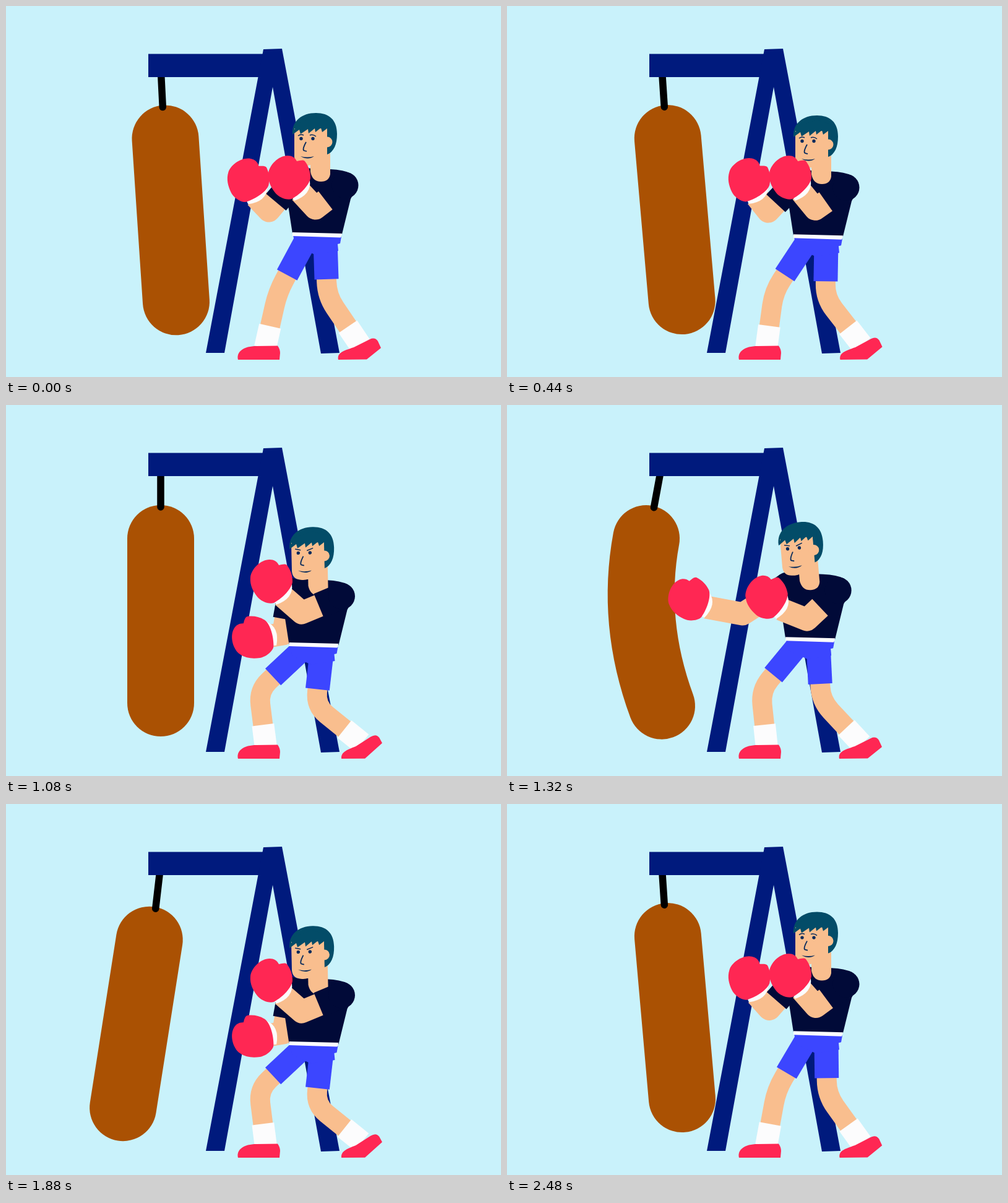
Recreate the animation shown at these times as an HTML page with a canvas. Size 800x600 px, loop 2.52 s.

```html
<!DOCTYPE html>
<html lang="en">
<head>
<meta charset="utf-8">
<title>Boxing training</title>
<style>
html, body { margin: 0; width: 100%; height: 100%; overflow: hidden; background: #c9f2fb; }
canvas { display: block; }
</style>
</head>
<body>
<canvas id="stage" width="800" height="600"></canvas>
<script>
const ctx = document.getElementById('stage').getContext('2d');
const LOOP = 2520, HITS = [1285, 2072];
const C = {
  sky: '#c9f2fb', stand: '#001a7d', bag: '#aa5103', skin: '#f9be8e', shirt: '#010a38',
  shorts: '#3c46ff', red: '#ff2753', white: '#fcfcfd', hair: '#034c68', ink: '#062a5c'
};

const lerp = (a, b, u) => a + (b - a) * u;
const mix = (p, q, u) => p.map((v, i) => lerp(v, q[i], u));
const add = (p, x, y) => [p[0] + x, p[1] + y];
const toward = (p, q, dist) => mix(p, q, dist / Math.hypot(q[0] - p[0], q[1] - p[1]));
const ease = (t, from, to) => {
  const u = Math.min(1, Math.max(0, (t - from) / (to - from)));
  return u * u * (3 - 2 * u);
};
const wrap = t => (t % LOOP + LOOP) % LOOP;

// Rises from a to b, holds until c and falls to d, in ms around each hit
const pulse = (t, a, b, c, d) => HITS.reduce((sum, hit) => {
  const since = wrap(t - hit + 600) - 600;
  return sum + ease(since, a, b) - ease(since, c, d);
}, 0);

function fill(color, d) {
  ctx.fillStyle = color;
  ctx.fill(new Path2D(d));
}
function stroke(color, width, d, cap = 'butt') {
  ctx.strokeStyle = color;
  ctx.lineWidth = width;
  ctx.lineCap = cap;
  ctx.lineJoin = 'round';
  ctx.stroke(new Path2D(d));
}
function dot(color, x, y, r) {
  ctx.fillStyle = color;
  ctx.beginPath();
  ctx.arc(x, y, r, 0, 7);
  ctx.fill();
}
function at(x, y, degrees, px, py, draw) {
  ctx.save();
  ctx.translate(x, y);
  ctx.rotate(degrees * Math.PI / 180);
  ctx.translate(-px, -py);
  draw();
  ctx.restore();
}

// Sideways offset of the bag's foot: a wave that starts far left and settles
function swing(since) {
  const drift = -80 * Math.exp(-since / 420);
  const wave = Math.cos(2 * Math.PI * (since - 410) / 470);
  return lerp(drift, 33, wave) * (1 - ease(since, 880, 1240));
}

function drawBag(t) {
  const since = HITS.map(hit => wrap(t - hit));
  const latest = Math.min(...since);
  const foot = lerp(swing(Math.max(...since)), swing(latest), ease(latest, 40, 140));
  const dent = pulse(t, 0, 65, 65, 200);
  const top = [250 + .3 * foot - 43 * dent, 216 - .06 * foot];
  const bottom = [250 + foot, 482 - .15 * foot + 8 * dent];
  const bend = [250 + .65 * foot - 86 * dent, (top[1] + bottom[1]) / 2];
  const hook = toward(top, bend, -51);
  stroke(C.bag, 108, `M${top} Q${bend} ${bottom}`, 'round');
  stroke('#000', 11.5, `M250 98 L${lerp(hook[0], 250, .2)} ${hook[1]}`, 'round');
}

function drawStand() {
  fill(C.stand, 'M230 77.5H416V115H230Z');
  fill(C.stand, 'M416 70L446 69L539 561L509 562L431 131L353 561L323 561Z');
}

// Where the knee of a two-bone leg lands
function knee(hip, ankle, thigh, shin) {
  const dx = ankle[0] - hip[0], dy = ankle[1] - hip[1];
  const d = Math.min(Math.hypot(dx, dy), thigh + shin - .1);
  const angle = Math.atan2(dy, dx) + Math.acos((thigh ** 2 + d * d - shin ** 2) / (2 * thigh * d));
  return add(hip, thigh * Math.cos(angle), thigh * Math.sin(angle));
}

function drawLeg(hip, ankle, thigh, shin, hem, width) {
  const k = knee(hip, ankle, thigh, shin);
  stroke(C.skin, 32, `M${hip} L${toward(k, hip, 23)} Q${k} ${toward(k, ankle, 23)} L${ankle}`);
  stroke(C.white, 36, `M${toward(ankle, k, 33)} L${toward(ankle, k, -3)}`);
  stroke(C.shorts, width, `M${hip} L${toward(hip, k, hem)}`);
}

function drawLegs(hx, hy) {
  const lift = Math.max(0, (hy + 1.2 * hx) / 20);
  drawLeg([516 + hx, 380 + hy], mix([571, 546], [574, 544], lift), 89, 93, 62, 39);
  drawLeg([486 + hx, 376 + hy], [419.5, 550], 99, 89, 67, 37);
  at(hx, hy, 0, 0, 0, () => fill(C.shorts, 'M464 371L542 373L540 384L536 385L537 396L499 402L468 388Z'));
  fill(C.red, 'M375 572C372 559 384 550 405 550L439 549.5Q443 555 443 561L442 572Z');
  const p = (a, b) => mix(a, b, lift);
  fill(C.red, `M${p([537, 572], [546, 572])}
    C${p([535, 561], [546, 563])} ${p([544, 558], [552, 559])} ${p([562, 552], [568, 552])}
    L${p([588, 539], [590, 535])} Q${p([596, 535], [600, 528])} ${p([601, 542], [605, 535])}
    L${p([606, 553], [609.5, 542])} L${p([583, 571.5], [578, 572])}Z`);
}

function drawGlove(x, y, turn) {
  at(x, y, turn, 476, 301, () => {
    fill(C.white, 'M491 282Q494 305 466 315L458 304L482 280Z');
    fill(C.red, `M462 312C454 315 440 309 435 302C428 293 423 283 424 271C425 258 440 242 455 242
      C462 242 467 245 470 251C475 250 480 248 483 251C489 259 492 267 492 278C491 288 478 303 462 312Z`);
  });
}

// Pose: elbow x, y, wrist x, y, turn of the glove
function drawArm(shoulder, [ex, ey, wx, wy, turn], sleeve) {
  const elbow = [ex, ey];
  stroke(C.skin, 37, `M${toward(shoulder, elbow, sleeve - 8)} L${elbow} L${wx} ${wy}`);
  stroke(C.shirt, 42, `M${shoulder} L${toward(shoulder, elbow, sleeve)}`);
  dot(C.shirt, ...shoulder, 21.5);
  drawGlove(wx, wy, turn);
}

function drawHead(anger) {
  fill(C.hair, 'M463 207C462 186 478 173 501 173C522 173 535 184 535 207C535 224 530 235 519 241L505 225L470 204Z');
  fill(C.skin, `M466 198V244Q467 257 480 258Q488 259 492 257V268Q495 284 509 284Q522 284 524 272
    V238L519 240V198Z`);
  dot(C.skin, 519, 220, 8.5);
  fill(C.hair, `M463 208L474 200L476 207L488 199L489 206L499 198L500 204L509 197L511 204
    L519 198L520 211L526 206V188L500 180L470 190Z`);
  dot(C.ink, 477, 214.5, 2.7);
  dot(C.ink, 496, 214.5, 2.7);
  const brow = (x1, y1, x2, y2) => stroke(C.ink, 1.5,
    `M${x1} ${y1} Q${(x1 + x2) / 2} ${(y1 + y2) / 2 - 3 * (1 - anger)} ${x2} ${y2}`);
  brow(472, 210 - 2 * anger, 481, 209 + anger);
  brow(491, 209 + 2 * anger, 501, 211 - 4 * anger);
  stroke(C.ink, 1.8, 'M485 220Q478 233 482 234L486 235');
  fill(C.ink, 'M476 243Q487 246 498 243Q488 250 476 243Z');
}

function drawBoxer(t) {
  const windUp = pulse(t, -370, -205, -170, -20);
  const punch = pulse(t, -150, 10, 65, 230);
  const anger = ease(t, 440, 800) - ease(t, 2150, 2480);

  // Five bounces per loop; he crouches to wind up, then rises and lunges into the punch
  const bob = 11 * (1 - Math.cos(10 * Math.PI * t / LOOP));
  const hx = -5.5 * windUp * (1 - punch) - punch * bob * bob / 28;
  const hy = lerp(lerp(bob, 18, windUp), 2, .58 * punch);
  const ty = hy * 1.07, crouch = hy / 20;

  const pose = (guard, back, hit) => mix(mix(guard, back, windUp), hit, punch);
  const left = pose(mix([425, 331, 404, 309, 12], [408, 338, 401, 307, 17], crouch),
    [448, 370, 430, 373, -60], [381, 338, 322, 327, -26]);
  const right = pose(mix([500, 327, 476, 301, 0], [489, 335, 475, 301, 2], crouch),
    [478, 336, 447, 309, 0], [508 + 1.8 * hx, 338 + hy, 468 + 2 * hx, 321 + hy, -11]);

  drawArm([466 + hx, 282 + ty], left, 46);
  drawLegs(hx, hy);
  at(hx, ty, 0, 0, 0, () => fill(C.shirt,
    'M463 368L455 316L451 288Q455 264 480 262L524 264Q546 265 558 271L569 290L557 312L543 369Z'));
  at(hx, hy, 0, 0, 0, () => fill(C.white, 'M463 366L543 368L541 374.5L463 372Z'));
  at(508 + 1.3 * hx + 4 * windUp - punch, 283 + 1.25 * hy - .3 * hx, .23 * hx - 2 * punch, 508, 283,
    () => drawHead(anger));
  drawArm([548 + hx, 290 + ty], right, 40);
}

const start = performance.now();
function frame() {
  const t = (performance.now() - start) % LOOP;
  ctx.fillStyle = C.sky;
  ctx.fillRect(0, 0, 800, 600);
  drawBag(t);
  drawStand();
  drawBoxer(t);
  requestAnimationFrame(frame);
}
frame();
</script>
</body>
</html>
```
